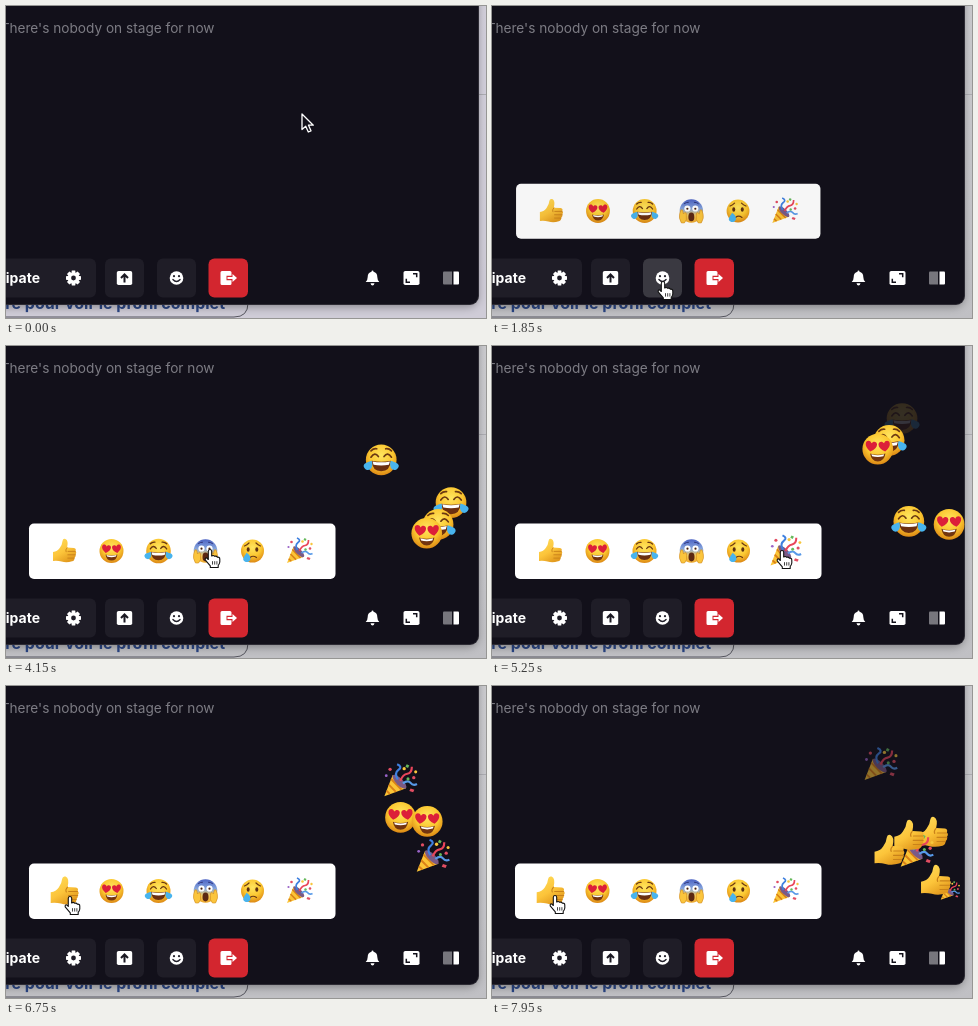
Animation of 480x312 px, one loop 8000 ms. Source, as an HTML page:

```html
<!DOCTYPE html>
<html lang="en">
<head>
<meta charset="utf-8">
<title>Stage reactions</title>
<style>
html, body { margin: 0; width: 100%; height: 100%; overflow: hidden; background: #12101a; }
svg { display: block; width: 100vw; height: 100vh; }
text { font-family: Inter, sans-serif; }
</style>
</head>
<body>
<svg id="stage" viewBox="0 0 480 312">
<defs>
  <radialGradient id="skin" cx=".5" cy=".35" r=".68">
    <stop offset="0" stop-color="#ffe55f"/><stop offset=".55" stop-color="#fbc730"/><stop offset="1" stop-color="#d98212"/>
  </radialGradient>
  <linearGradient id="fear" x2="0" y2="1">
    <stop offset="0" stop-color="#4b62c4"/><stop offset=".4" stop-color="#86a5dc"/><stop offset=".7" stop-color="#f4c95a"/><stop offset="1" stop-color="#eda628"/>
  </linearGradient>
  <linearGradient id="hand" x2=".6" y2="1">
    <stop offset="0" stop-color="#ffdf5c"/><stop offset=".6" stop-color="#fcc43a"/><stop offset="1" stop-color="#e29a1e"/>
  </linearGradient>
  <linearGradient id="page" x2="0" y2="1">
    <stop offset="0" stop-color="#cbcbcf"/><stop offset=".6" stop-color="#c6c6ca"/><stop offset="1" stop-color="#c0c0c4"/>
  </linearGradient>
  <filter id="blur" x="-10%" y="-10%" width="120%" height="120%"><feGaussianBlur stdDeviation="4"/></filter>

  <path id="heart" d="M0 4C-3 2-4.300 .2-4.100-1.700C-3.900-3.800-1-4.200 0-2C1-4.200 3.900-3.800 4.100-1.700C4.300 .2 3 2 0 4Z" fill="#dc1f39"/>
  <path id="tear" d="M0-4C2.500-2.500 4 0 3.200 2.400C2.400 4.600-1.500 4.800-2.600 2.600C-3.500 .5-1.500-1 0-4Z" fill="#48b4ee"/>

  <g id="love">
    <circle r="12" fill="url(#skin)"/>
    <use href="#heart" transform="translate(-5.200 -2.400) rotate(8) scale(1.080)"/>
    <use href="#heart" transform="translate(5.200 -2.400) rotate(-8) scale(1.080)"/>
    <path d="M-6 3.400Q0 5.400 6 3.400Q5 9.600 0 9.600T-6 3.400Z" fill="#73350f"/>
    <path d="M-5 4Q0 5.600 5 4L4.400 5.600Q0 6.800-4.400 5.600Z" fill="#fff"/>
  </g>
  <g id="laugh">
    <circle r="12" fill="url(#skin)"/>
    <path d="M-8-2Q-5-6.500-2.200-2.500M8-2Q5-6.500 2.200-2.500M-8-7Q-6-9-3.500-8.600M8-7Q6-9 3.500-8.600" fill="none" stroke="#6b3812" stroke-width="1.300" stroke-linecap="round"/>
    <path d="M-7.500 .8Q0 2.400 7.500 .8Q7 9 0 9T-7.500 .8Z" fill="#6b2f10"/>
    <path d="M-6.800 1.300Q0 2.700 6.800 1.300L6 3.800Q0 5-6 3.800Z" fill="#fff"/>
    <use href="#tear" transform="translate(-10 3.800) rotate(38)"/>
    <use href="#tear" transform="translate(10 3.800) rotate(-38) scale(-1 1)"/>
  </g>
  <g id="scared">
    <circle r="11.800" fill="url(#fear)"/>
    <circle cx="-4" cy="-2.500" r="3.100" fill="#fff"/><circle cx="4" cy="-2.500" r="3.100" fill="#fff"/>
    <circle cx="-4" cy="-2.300" r="1.100" fill="#47220e"/><circle cx="4" cy="-2.300" r="1.100" fill="#47220e"/>
    <path d="M-7-7.500Q-5-9-3-8.800M7-7.500Q5-9 3-8.800" fill="none" stroke="#30377c" stroke-linecap="round"/>
    <ellipse cy="6" rx="3" ry="4.400" fill="#5c2813"/>
    <path id="palm" d="M-10.500-1Q-9-2-8.600 0L-8 3L-6.500 1.500Q-4.500 1.600-5 4.500Q-4 9-7 12H-10Q-13 7-11.800 3Z" fill="#fbc53d" stroke="#d08a1f" stroke-width=".6"/>
    <use href="#palm" transform="scale(-1 1)"/>
  </g>
  <g id="cry">
    <circle r="11.500" fill="url(#skin)"/>
    <ellipse cx="-4.300" cy="-1.500" rx="1.500" ry="2.200" fill="#5d3012"/><ellipse cx="4.300" cy="-1.500" rx="1.500" ry="2.200" fill="#5d3012"/>
    <path d="M-8-5Q-5.500-6-3.500-8M8-5Q5.500-6 3.500-8M-2.500 6.500Q.5 4 4 6.500" fill="none" stroke="#6b3812" stroke-width="1.200" stroke-linecap="round"/>
    <use href="#tear" transform="translate(-6 6.300) scale(1.150)"/>
  </g>
  <g id="thumb">
    <path d="M-11.500 1Q-7 .5-4.800-3Q-2.200-6.500-2-10Q-1.500-12.800 .9-12Q4.300-10.500 2.600-3.400L9.500-3Q12-2.400 11 .1Q12.600 1.600 11 3.600Q11.800 5.600 9.900 6.900Q10.200 9.600 7.600 10.300Q2 12-3 10.500Q-7 9.500-11.500 10Z" fill="url(#hand)"/>
    <path d="M3.500 .4H10.800M3.300 3.800H11M3.300 7.100H9.800M2.500-3.200Q.5-1 1.500 .8" fill="none" stroke="#c9821a" stroke-width=".9" stroke-linecap="round"/>
  </g>
  <g id="party">
    <path d="M-12.500 12L-6-4.500Q1-1 4.500 5.800Z" fill="#fbc436"/>
    <path d="M-10.800 7.800L-8.200 10.200M-9 3L-3.500 8.600M-7.200-1.400L1 7" stroke="#d98018" stroke-width="1.500"/>
    <ellipse cx="-.7" cy=".7" rx="7.200" ry="2.700" transform="rotate(45 -.7 .7)" fill="#7b5a86"/>
    <path d="M-2-1Q-5-6-1.500-8.500T-2.500-13" fill="none" stroke="#3f80df" stroke-width="1.700"/>
    <path d="M0 0Q2-5 5.500-5.500T9-11" fill="none" stroke="#e9455a" stroke-width="1.700"/>
    <path d="M2 2Q6-1 8 1.600T13 2.500" fill="none" stroke="#5799e8" stroke-width="1.700"/>
    <g fill="#e24d62"><circle cx="-8" cy="-9" r="1.300"/><circle cx="10.500" cy="-2.500" r="1.300"/><path d="M8 6l3 1-1 2-3-1z"/></g>
    <g fill="#f7c63c"><circle cx="3" cy="-9.500" r="1.300"/><circle cx="12" cy="-7" r="1.200"/></g>
    <g fill="#66b95b"><circle cx="6" cy="-1.500" r="1.200"/><path d="M5-13l2 1-1 2-2-1z"/></g>
    <circle cx="-11" cy="-4" r="1.100" fill="#9a64c8"/>
  </g>
</defs>

<rect width="480" height="312" fill="url(#page)"/>
<rect id="tint" width="480" height="312" fill="#d9d4e4"/>
<path d="M470 88.500H480" stroke="#aeaeb3"/>
<path d="M-5 311H228Q242 311 242 297" fill="none" stroke="#55555e"/>
<text x="219" y="302.500" text-anchor="end" font-size="16" font-weight="700" fill="#2b4685">re pour voir le profil complet</text>
<rect x="-30" y="-30" width="502" height="331" rx="10" fill="#000" opacity=".34" filter="url(#blur)"/>
<rect x="-30" y="-30" width="503" height="329" rx="9" fill="#2d2b34"/>
<rect x="-30" y="-30" width="502" height="328" rx="8" fill="#12101a"/>
<text x="208.500" y="27" text-anchor="end" font-size="13.650" fill="#7d7c84">There's nobody on stage for now</text>

<g fill="#1f1d27">
  <rect x="-60" y="252.500" width="150" height="39" rx="6"/>
  <rect x="99" y="252.500" width="39" height="39" rx="6"/>
  <rect id="smileBtn" x="151" y="252.500" width="39" height="39" rx="6"/>
  <rect x="202.500" y="252.500" width="39.500" height="39" rx="6" fill="#d3262f"/>
</g>
<text x="34" y="277" text-anchor="end" font-size="14" font-weight="700" fill="#fff">Participate</text>
<g fill="#fff">
  <g transform="translate(67.500 272)">
    <path id="teeth" d="M-1.700-7.500H1.700L2.200-4H-2.200ZM-1.700 7.500H1.700L2.200 4H-2.200Z"/>
    <use href="#teeth" transform="rotate(45)"/><use href="#teeth" transform="rotate(90)"/><use href="#teeth" transform="rotate(135)"/>
    <circle r="4" fill="none" stroke="#fff" stroke-width="3.200"/>
  </g>
  <g transform="translate(118.500 272)">
    <rect x="-7.700" y="-7" width="15.400" height="14" rx="1.800"/>
    <path d="M0 4.500V-3M-3.500 0L0-3.500L3.500 0" fill="none" stroke="#1b1923" stroke-width="2"/>
  </g>
  <g transform="translate(170.500 272)">
    <circle r="6.800"/>
    <g fill="#22202a"><circle cx="-2.500" cy="-1.800" r="1.100"/><circle cx="2.500" cy="-1.800" r="1.100"/></g>
    <path d="M-3.600 1.500Q0 5.500 3.600 1.500" fill="none" stroke="#22202a" stroke-width="1.300" stroke-linecap="round"/>
  </g>
  <g transform="translate(222.500 272)">
    <path d="M-6.500-7H1.500Q3-7 3-5.500V-2.200H-2V2.200H3V5.500Q3 7 1.500 7H-6.500Q-8 7-8 5.500V-5.500Q-8-7-6.500-7Z"/>
    <path d="M-1-1H4V-4L8.500 0L4 4V1H-1Z"/>
  </g>
  <g transform="translate(366.500 272)">
    <path d="M0-7.500Q1-7.500 1-6.300Q4.800-5.500 4.800-1Q4.800 2 6.800 4H-6.800Q-4.800 2-4.800-1Q-4.800-5.500-1-6.300Q-1-7.500 0-7.500ZM-2 5.200H2Q1.500 7.500 0 7.500T-2 5.200Z"/>
  </g>
  <g transform="translate(405.500 272)">
    <rect x="-8" y="-7" width="16" height="14" rx="1.800"/>
    <path d="M1.500-4.200H5.200V-.8M-1.500 4.200H-5.200V.8" fill="none" stroke="#12101a" stroke-width="1.500"/>
  </g>
  <path d="M438 265.500H446V278.500H438Q437 278.500 437 277.500V266.500Q437 265.500 438 265.500Z" fill="#77767d"/>
  <path d="M447.500 265.500H452Q453 265.500 453 266.500V277.500Q453 278.500 452 278.500H447.500Z"/>
</g>

<g id="popup">
  <rect x="23" y="177.500" width="306.500" height="55.500" rx="5" fill="#fff"/>
  <g id="choices"></g>
</g>
<g id="flights"></g>
<path id="arrow" d="M0 0V15.500L3.700 12.200L6.300 18L9 16.800L6.500 11.200H11.300Z" fill="#14121b" stroke="#fff" stroke-width="1.300" stroke-linejoin="round"/>
<g id="pointer" stroke="#111" stroke-width="1.100" stroke-linejoin="round">
  <path d="M-1.700 .2Q-1.500-1.500 0-1.500T1.700 .2V5Q3.500 3.800 4.600 5.300Q6.500 4.600 7.400 6.200Q9.800 5.800 9.800 8.200V11Q9.500 13 8.200 14.500V16.500H.3V14.800L-4.800 8.800Q-5 6.500-3.200 7L-1.700 8.500Z" fill="#fff"/>
  <path d="M2.500 10.200V13.600M4.700 10.200V13.600M6.900 10.200V13.600" fill="none" stroke-width=".8"/>
</g>
</svg>

<script>
const LOOP = 8000, LIFE = 1820, HOVER_LAG = 110;
const $ = id => document.getElementById(id);
const clamp = (v, a = 0, b = 1) => Math.min(b, Math.max(a, v));
const span = (t, a, b) => clamp((t - a) / (b - a));
const smooth = p => p * p * (3 - 2 * p);

const kinds = ["thumb", "love", "laugh", "scared", "cry", "party"];
const choiceX = i => 58.5 + i * 47;

// kind, launch time, launch x; listed from back to front
const launches = [
  ["laugh", 2900, 415], ["laugh", 3460, 467], ["laugh", 3745, 445], ["love", 3860, 430],
  ["laugh", 4805, 431], ["love", 4845, 470], ["party", 5252, 442], ["love", 5730, 427],
  ["love", 5783, 452], ["party", 6240, 443], ["thumb", 7127, 467], ["party", 7375, 443],
  ["thumb", 7166, 442], ["thumb", 7362, 416], ["party", 7890, 460], ["thumb", 7754, 450]
];

// time, x, y of the cursor tip
const path = [
  [0, 296, 108], [1180, 171, 277], [2200, 171, 277], [2650, 158, 207],
  [3300, 158, 207], [3600, 109, 208], [3850, 109, 208], [4150, 204, 205],
  [4700, 204, 205], [5150, 290, 206], [5500, 290, 206], [6200, 192, 209],
  [6300, 190, 209], [6700, 64, 212], [7400, 63, 211], [8000, 63, 211]
];

const useAll = list => list.map(k => `<use href="#${k}"/>`).join("");
$("choices").innerHTML = useAll(kinds);
$("flights").innerHTML = useAll(launches.map(l => l[0]));
const choices = [...$("choices").children], flights = [...$("flights").children];

function place(el, x, y, scale = 1) {
  el.setAttribute("transform", `translate(${x.toFixed(2)} ${y.toFixed(2)}) scale(${scale.toFixed(3)})`);
}

function show(el, opacity) {
  el.setAttribute("opacity", opacity.toFixed(3));
}

function cursorAt(t) {
  const i = Math.max(1, path.findIndex(k => k[0] > t));
  const [a, b] = [path[i - 1], path[i]];
  const p = smooth(span(t, a[0], b[0]));
  return [a[1] + (b[1] - a[1]) * p, a[2] + (b[2] - a[2]) * p];
}

function draw(t) {
  const [x, y] = cursorAt(t);
  const onButton = x > 151 && x < 190 && y > 253;
  const onPopup = t > 1700 && y < 233;
  const hand = onButton || onPopup;
  place($("arrow"), x, y);
  place($("pointer"), x, y);
  show($("arrow"), hand ? 0 : 1);
  show($("pointer"), hand ? 1 : 0);
  $("smileBtn").setAttribute("fill", onButton ? "#3a3941" : "#1f1d27");
  show($("tint"), 0.6 * (1 - span(t, 850, 1200)));

  const open = 1 - (1 - span(t, 1680, 1890)) ** 2;
  const s = 0.8 + 0.2 * open;
  $("popup").setAttribute("transform", `translate(176.250 205.250) scale(${s}) translate(-176.250 -205.250)`);
  show($("popup"), open);
  const [hoverX] = cursorAt(Math.max(0, t - HOVER_LAG));
  choices.forEach((el, i) => {
    const near = onPopup ? clamp((20 - Math.abs(hoverX - 4 - choiceX(i))) / 8) : 0;
    place(el, choiceX(i), 205, 1 + 0.2 * near);
  });

  flights.forEach((el, i) => {
    const [, start, x0] = launches[i];
    const age = t - start;
    const alive = age >= 0 && age < LIFE;
    show(el, alive ? 1 - span(age, 1620, LIFE) : 0);
    if (alive) place(el, x0 - age * 0.0318, 209.5 - age * 0.0765, 1.28 * (0.3 + 0.7 * span(age, 0, 150)));
  });
}

const begin = performance.now();
function tick() {
  draw((performance.now() - begin) % LOOP);
  requestAnimationFrame(tick);
}
tick();
</script>
</body>
</html>
```
